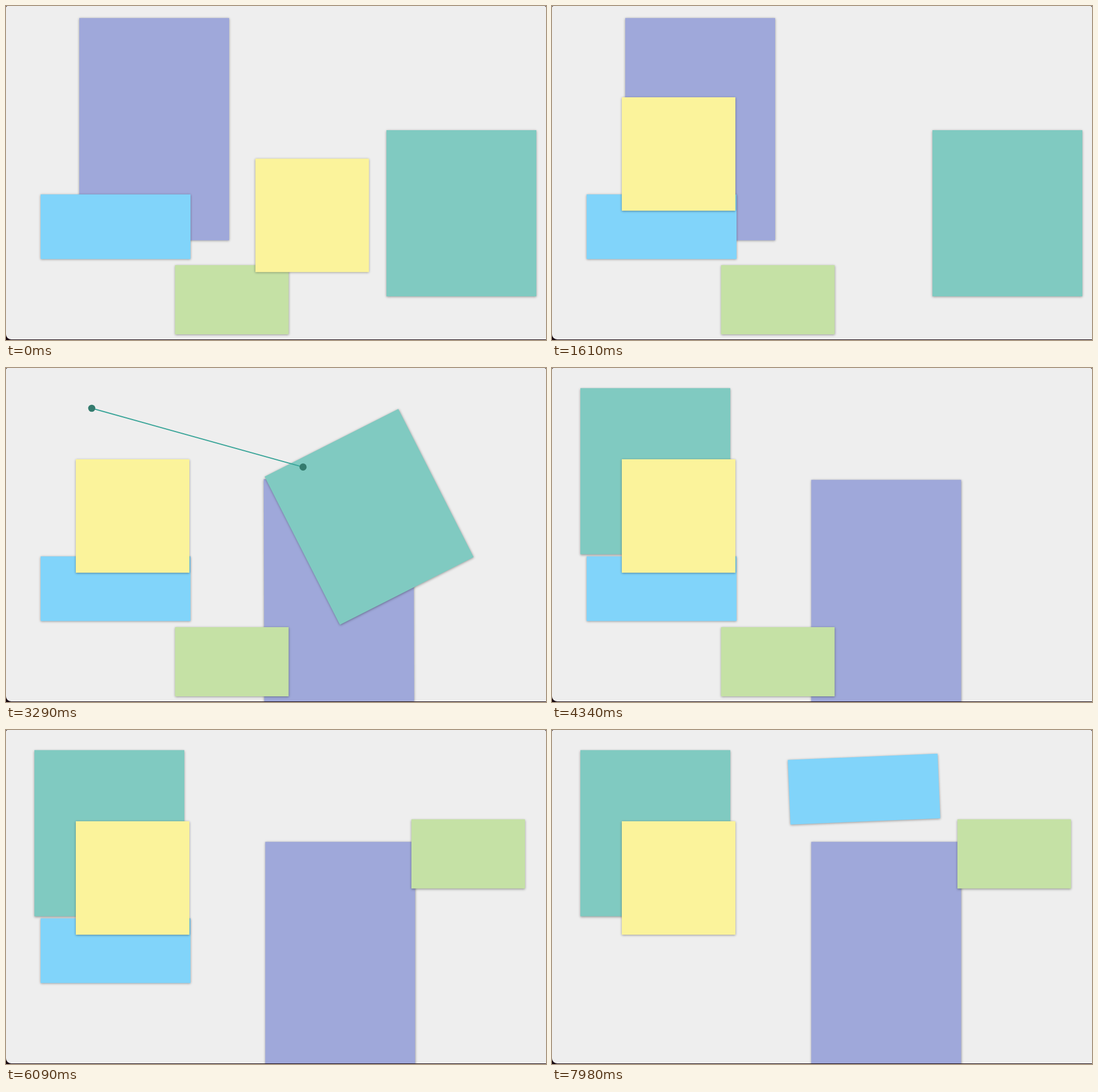
Animation, 951 px wide and 589 px high, one loop 8 s. Source, as an HTML page:

```html
<!DOCTYPE html>
<html lang="en">
<head>
<meta charset="utf-8">
<title>Dragged cards</title>
<style>
  html, body { margin: 0; width: 100%; height: 100%; overflow: hidden; background: #16060f; }
  #stage { position: absolute; left: 0; top: 0; width: 951px; height: 588px; overflow: hidden; background: #eee; border-radius: 3px 3px 0 9px; }
  .card { position: absolute; left: 0; top: 0; box-shadow: 0 1px 4px rgba(0, 0, 0, .37); }
  svg { position: absolute; left: 0; top: 0; }
  line { stroke-width: 1.9; }
</style>
</head>
<body>
<div id="stage"></div>
<script>
const LOOP = 8000, STEP = 70, RELEASE = 0.6;
const stage = document.getElementById('stage');

// Cards from back to front. Each swings from home through mid to rest, posed as
// { x, y, tilt } of its centre, at the three given times in ms.
// grip is the held point relative to the centre, hand the pointer at mid time.
const pose = (x, y, tilt = 0) => ({ x, y, tilt });
const cards = [
  { size: [264, 391.5], fill: '#9fa8da', dot: '#303f9f', rod: '#5c6bc0', times: [1610, 2170, 3360],
    home: pose(261, 217), mid: pose(297.6, 207, -14.7), rest: pose(588.5, 393),
    grip: pose(-54, -161), hand: pose(42, 66) },
  { size: [264, 293], fill: '#80cac1', dot: '#347b6e', rod: '#3ba599', times: [2940, 3290, 3900],
    home: pose(802, 365.5), mid: pose(639.5, 262.5, -26.9), rest: pose(182, 182),
    grip: pose(-64, -131), hand: pose(151, 71) },
  { size: [264, 113.5], fill: '#81d4fa', dot: '#4285cf', rod: '#4dabf2', times: [6160, 6860, 7980],
    home: pose(193, 389), mid: pose(596.5, 373, -1.8), rest: pose(549.5, 104, -2.4),
    grip: pose(16, 18.5), hand: pose(647, 404) },
  { size: [200, 122], fill: '#c5e1a5', dot: '#639d37', rod: '#9ccc65', times: [4480, 5320, 6000],
    home: pose(397.7, 518), mid: pose(324, 306.7, 23.4), rest: pose(814, 218.5),
    grip: pose(76, -48), hand: pose(774, 169) },
  { size: [199.5, 199.5], fill: '#fbf39b', times: [70, 910, 1540],
    home: pose(539, 369), mid: pose(373.3, 214.3, -14.5), rest: pose(222.7, 260.7) }
];

// Cubic from a to b; slopes are per unit of u.
const cubic = (a, b, slopeA, slopeB, u) =>
  a + (b - a) * u * u * (3 - 2 * u) + u * (1 - u) * ((1 - u) * slopeA - u * slopeB);

// Starts and ends at rest and passes mid at the mean speed.
function swing([start, middle, end], from, via, to, time) {
  const t = Math.min(Math.max(time, start), end);
  const value = key => {
    const speed = (to[key] - from[key]) / (end - start);
    return t < middle
      ? cubic(from[key], via[key], 0, speed * (middle - start), (t - start) / (middle - start))
      : cubic(via[key], to[key], speed * (end - middle), 0, (t - middle) / (end - middle));
  };
  return pose(value('x'), value('y'), value('tilt'));
}

function heldPoint({ x, y, tilt }, grip) {
  const angle = tilt * Math.PI / 180, cos = Math.cos(angle), sin = Math.sin(angle);
  return pose(x + grip.x * cos - grip.y * sin, y + grip.x * sin + grip.y * cos);
}

function svgNode(name, attributes, parent) {
  const node = document.createElementNS('http://www.w3.org/2000/svg', name);
  for (const key in attributes) node.setAttribute(key, attributes[key]);
  return parent.appendChild(node);
}

for (const card of cards) {
  const [width, height] = card.size;
  card.node = stage.appendChild(document.createElement('div'));
  card.node.className = 'card';
  card.node.style.cssText = `width:${width}px;height:${height}px;background:${card.fill}`;
}

const overlay = svgNode('svg', { width: 951, height: 588 }, stage);
for (const card of cards.filter(c => c.hand)) {
  card.link = svgNode('g', {}, overlay);
  card.line = svgNode('line', { stroke: card.rod }, card.link);
  card.ends = [0, 1].map(() => svgNode('circle', { r: 6.3, fill: card.dot }, card.link));
}

function drawLink({ times, home, rest, grip, hand, link, line, ends }, current, time) {
  const [start, middle, end] = times;
  const active = time > start && time < middle + (end - middle) * RELEASE;
  link.style.display = active ? '' : 'none';
  if (!active) return;
  const pointer = swing(times, heldPoint(home, grip), hand, heldPoint(rest, grip), time);
  [heldPoint(current, grip), pointer].forEach(({ x, y }, i) => {
    line.setAttribute('x' + (i + 1), x);
    line.setAttribute('y' + (i + 1), y);
    ends[i].setAttribute('cx', x);
    ends[i].setAttribute('cy', y);
  });
}

function draw(time) {
  for (const card of cards) {
    const current = swing(card.times, card.home, card.mid, card.rest, time);
    const [width, height] = card.size;
    card.node.style.transform =
      `translate(${current.x - width / 2}px, ${current.y - height / 2}px) rotate(${current.tilt}deg)`;
    if (card.hand) drawLink(card, current, time);
  }
}

const start = performance.now();
function tick() {
  const time = (performance.now() - start) % LOOP;
  draw(Math.floor(time / STEP) * STEP);
  requestAnimationFrame(tick);
}
tick();
</script>
</body>
</html>
```
